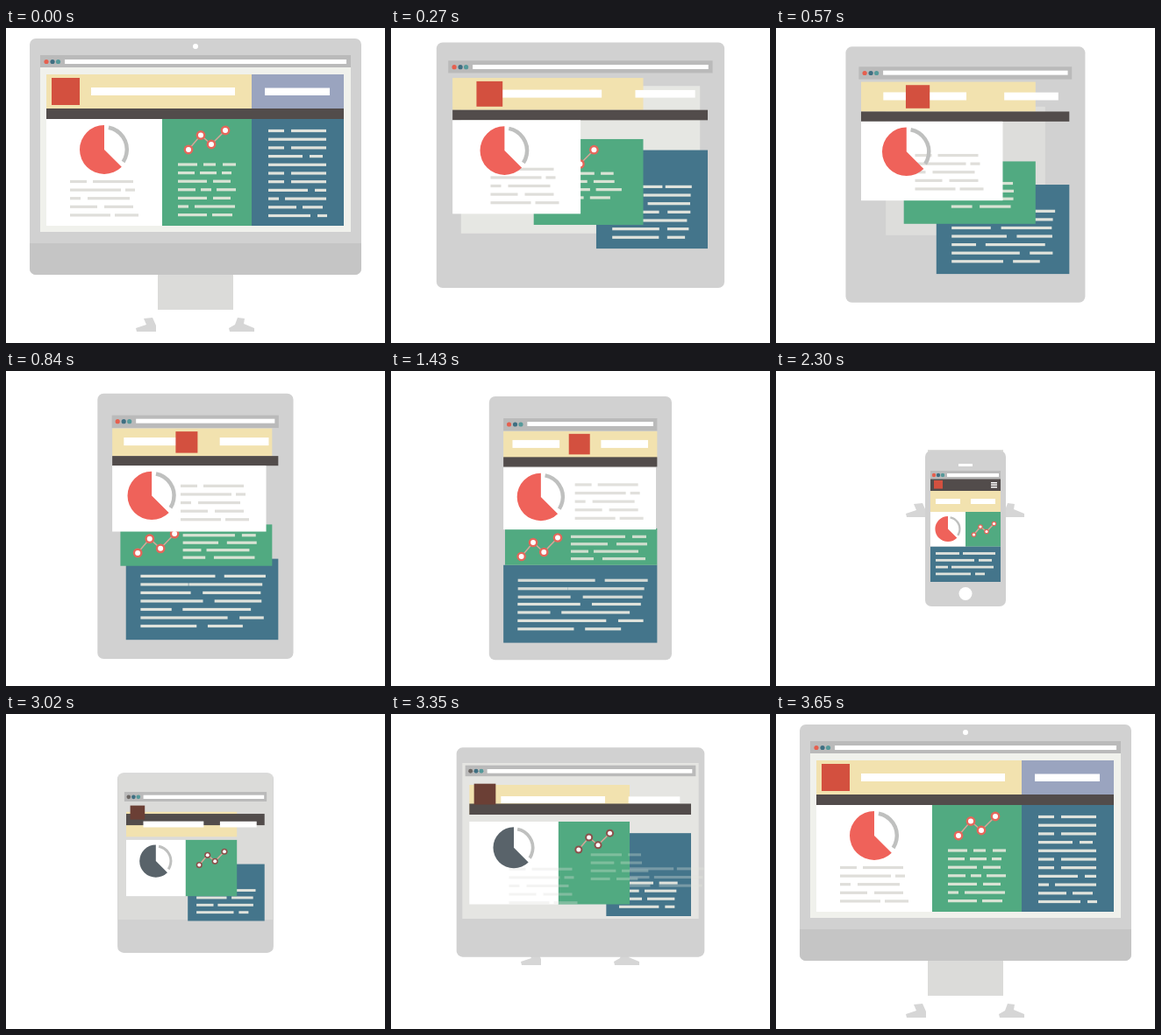
These frames come from a looping animation (432x360 px, 4.15 s). An HTML page with a canvas:

```html
<!DOCTYPE html>
<html lang="en">
<head>
<meta charset="utf-8">
<title>Responsive layout</title>
<style>
html, body { margin: 0; width: 100%; height: 100%; overflow: hidden; background: #fff; }
canvas { display: block; }
</style>
</head>
<body>
<canvas id="stage" width="432" height="360"></canvas>
<script>
const ctx = document.getElementById('stage').getContext('2d');
const LOOP = 4150, STEP = 30, STEPS = 30;
const GREY = '#d1d1d1', WHITE = '#fff', DARK = '#524c4b';

// Every box is [left, top, right, bottom] on desktop, tablet and phone.
const body = [[27, 12, 405, 282], [109.8, 26.8, 322, 332.3], [170, 91, 262, 269]];
const bezel = [[39, 45, 393, 233], [175, 116, 257, 239], [166, 78, 266, 236]];
const bar = [[39, 31, 393, 45], [126.5, 52, 305, 66.5], [176, 114, 256, 123.5]];
const address = [[67, 36, 388, 41], [154, 56, 300.5, 61], [195, 117, 254, 121]];
const header = [[46, 53, 280, 92], [126.5, 66.5, 305, 97.5], [176, 137, 256, 161]];
const menu = [[46, 92, 385, 104], [126.5, 97.5, 305, 108.5], [176, 123.5, 256, 137]];
const field1 = [[97, 68, 261, 77], [137, 76.6, 191.5, 85.7], [182, 146, 210, 152]];
const field2 = [[295, 68.5, 369, 77], [240, 76.6, 294.5, 85.7], [222, 146, 250, 152]];
const badge = [[52, 57, 84, 88], [203.5, 70, 228, 94], [180, 125, 190, 134.5]];
const whitePanel = [[46, 104, 178, 226], [126.5, 108.5, 305, 180.5], [176, 161, 216, 200.5]];
const greenPanel = [[178, 104, 280, 226], [127, 180.5, 305, 222.5], [216, 161, 256, 200.5]];
const bluePanel = [[280, 104, 385, 226], [126.5, 222.5, 305, 313], [176, 200.5, 256, 241]];

const dots = [[46, 38.5, 53, 38.5, 59.5, 38.5], [133, 59, 140, 59, 146.5, 59], [180, 119, 185, 119, 190, 119]];
const nodes = [
  [208, 139, 222, 122.5, 234, 133, 250, 117],
  [146, 212.8, 159.6, 196.6, 172, 207.8, 188, 191],
  [225.5, 187, 233, 178, 240, 183.5, 248.5, 174.5]
];
const pie = [[112, 139, 28], [170, 142.7, 27.6], [196, 180.5, 14.6]];

// Text bars: first row index, y of first row, line spacing, x pairs per row.
const whiteRows = [
  [73, 92, 99, 145], [73, 131, 136, 147], [73, 85, 93, 141], [73, 104, 112, 145], [73, 119, 124, 151]
];
const whiteText = [
  { first: 0, y: 175.5, dy: 9.6, rows: whiteRows },
  { first: 0, y: 128.2, dy: 9.6, rows: whiteRows.map(r => r.map(x => x + 135)) }
];
const greenText = [
  { first: 0, y: 156, dy: 9.6, rows: [
    [196, 218, 225, 239, 247, 262], [196, 215, 221, 240, 246, 257], [196, 229, 236, 256],
    [196, 216, 222, 234, 240, 262], [196, 229, 236, 256], [196, 208, 215, 261], [196, 229, 235, 258]] },
  { first: 0, y: 190, dy: 8.4, rows: [
    [202, 264, 272, 288], [202, 244, 254, 289], [202, 222, 228, 279], [202, 228, 238, 287]] }
];
const blueText = [
  { first: 0, y: 117.5, dy: 9.7, rows: [
    [299, 317, 325, 365], [299, 365], [299, 317, 325, 365], [299, 338, 346, 361],
    [299, 343, 343, 365], [299, 317, 325, 365], [299, 317, 325, 365], [299, 344, 352, 365],
    [299, 311, 318, 365], [299, 331, 338, 361], [299, 347, 355, 366]] },
  { first: 4, y: 240, dy: 9.5, rows: [
    [143, 231, 242, 291], [143, 200, 200, 287], [143, 203, 217, 285], [143, 216, 229.5, 286],
    [143, 180, 193, 273], [143, 247, 261, 289], [143, 208, 221, 263]] },
  { first: 7, y: 208.5, dy: 7.8, rows: [
    [182, 209, 213, 250], [182, 226, 231, 246], [182, 196, 200, 248], [182, 222, 227, 238]] }
];

let desk, tab, phone;
const clamp = v => Math.max(0, Math.min(1, v));
const late = v => clamp((v - 0.7) / 0.3);
const mix = ([d, t, p]) => d.map((v, i) => v * desk + t[i] * tab + p[i] * phone);
const progress = (t, start) => clamp(Math.floor((t - start) / STEP + 1e-6) / STEPS);

function box([l, t, r, b], color, alpha = 1) {
  ctx.globalAlpha = alpha;
  ctx.fillStyle = color;
  ctx.fillRect(l, t, r - l, b - t);
  ctx.globalAlpha = 1;
}

function disc(x, y, r, color, alpha = 1) {
  ctx.globalAlpha = alpha;
  ctx.fillStyle = color;
  ctx.beginPath();
  ctx.arc(x, y, r, 0, 7);
  ctx.fill();
  ctx.globalAlpha = 1;
}

function shape(points, color) {
  ctx.fillStyle = color;
  ctx.beginPath();
  points.forEach(([x, y]) => ctx.lineTo(x, y));
  ctx.fill();
}

function bars(panel, text, color) {
  const h = 1.6 - 0.2 * phone;
  text[0].rows.forEach((row, i) => {
    for (let j = 0; j < row.length; j += 2) {
      const poses = [];
      let alpha = 1;
      for (let s = 0; s < 3; s++) {
        const g = text[s], xs = g && g.rows[i - g.first];
        if (xs && xs.length > j) {
          poses.push([xs[j], xs[j + 1], g.y + (i - g.first) * g.dy]);
          continue;
        }
        // A bar with no place in this layout fades out riding on its panel.
        const [x1, x2, y] = poses[s - 1];
        const dx = panel[s][0] - panel[s - 1][0], dy = panel[s][1] - panel[s - 1][1];
        poses.push([x1 + dx, x2 + dx, y + dy]);
        alpha = Math.min(alpha, s === 1 ? late(desk) : clamp(1 - 2 * phone));
      }
      const [l, r, y] = mix(poses);
      if (alpha) box([l, y - h, r, y + h], color, alpha);
    }
  });
}

function stand() {
  ctx.save();
  ctx.translate(0, -180 * (1 - desk));
  box([173, 270, 259, 322], '#dbdbd9');
  shape([[157, 332], [167, 331], [171, 340], [171, 347], [149, 347], [148, 343], [160, 339]], '#d6d6d6');
  shape([[264, 331], [272, 332], [271, 338], [283, 343], [283, 347], [255, 347], [254, 343], [261, 339]], '#d6d6d6');
  ctx.restore();
}

function device() {
  const [l, t, r, b] = mix(body);
  ctx.save();
  ctx.beginPath();
  ctx.roundRect(l, t, r - l, b - t, 7);
  ctx.fillStyle = GREY;
  ctx.fill();
  ctx.clip();
  box([l, b - 36, r, b], '#c5c5c5', late(desk));
  box(mix(bezel), '#f0f1ec', desk);
  ctx.restore();
  disc(216, t + 9, 3, WHITE, late(desk));
  disc(216, b - 14.5, 7.5, WHITE, late(phone));
  box([208, t + 15, 224, t + 18], WHITE, late(phone));
}

function chart(ring) {
  const n = mix(nodes), size = 1 - 0.48 * phone;
  ctx.strokeStyle = '#d8a698';
  ctx.lineWidth = 1.5;
  ctx.beginPath();
  for (let i = 0; i < 8; i += 2) ctx.lineTo(n[i], n[i + 1]);
  ctx.stroke();
  for (let i = 0; i < 8; i += 2) {
    disc(n[i], n[i + 1], 5.4 * size, ring);
    disc(n[i], n[i + 1], 3 * size, WHITE);
  }
}

function pieChart(color) {
  const [x, y, r] = mix(pie), turn = Math.PI / 180;
  ctx.fillStyle = color;
  ctx.beginPath();
  ctx.moveTo(x, y);
  ctx.arc(x, y, r, 45 * turn, 270 * turn);
  ctx.fill();
  ctx.strokeStyle = '#bfc0bf';
  ctx.lineWidth = r * 0.16;
  ctx.beginPath();
  ctx.arc(x, y, r * 0.92, -79 * turn, 33 * turn);
  ctx.stroke();
}

function draw(t) {
  const a = progress(t, 0), b = progress(t, 1400), c = progress(t, 2750);
  desk = 1 - a + c;
  tab = a - b;
  phone = b - c;
  const dull = c > 0 && c < 1;

  box([0, 0, 432, 360], WHITE);
  stand();
  device();

  box(mix(bar), '#bababa');
  box(mix(address), WHITE);
  const d = mix(dots);
  [dull ? '#6b6663' : '#e5604f', '#3f6f82', '#55999a'].forEach((color, i) =>
    disc(d[2 * i], d[2 * i + 1], 2.6 - 0.4 * phone, color));

  const head = mix(header), strip = mix(menu);
  box(head, '#f2e2af');
  box([head[2], head[1], strip[2], head[3]], '#9aa4bf', late(desk));
  box(strip, DARK);
  for (let i = 0; i < 3; i++) {
    const y = strip[1] + 3.5 + 2.5 * i;
    box([strip[2] - 11, y, strip[2] - 4, y + 1.5], WHITE, late(phone));
  }
  box(mix(field1), WHITE);
  box(mix(field2), WHITE);
  box(mix(badge), dull ? '#6b3f35' : '#d3503f');

  box(mix(bluePanel), '#44758b');
  bars(bluePanel, blueText, '#e0e3dc');
  box(mix(greenPanel), '#51aa81');
  bars(greenPanel, greenText, '#d9e3d4');
  chart(dull ? '#8c504b' : '#e5665a');
  box(mix(whitePanel), WHITE);
  bars(whitePanel, whiteText, '#dfdeda');
  pieChart(dull ? '#59636a' : '#ef625a');
}

const start = performance.now();
function frame() {
  draw((performance.now() - start) % LOOP);
  requestAnimationFrame(frame);
}
frame();
</script>
</body>
</html>
```
